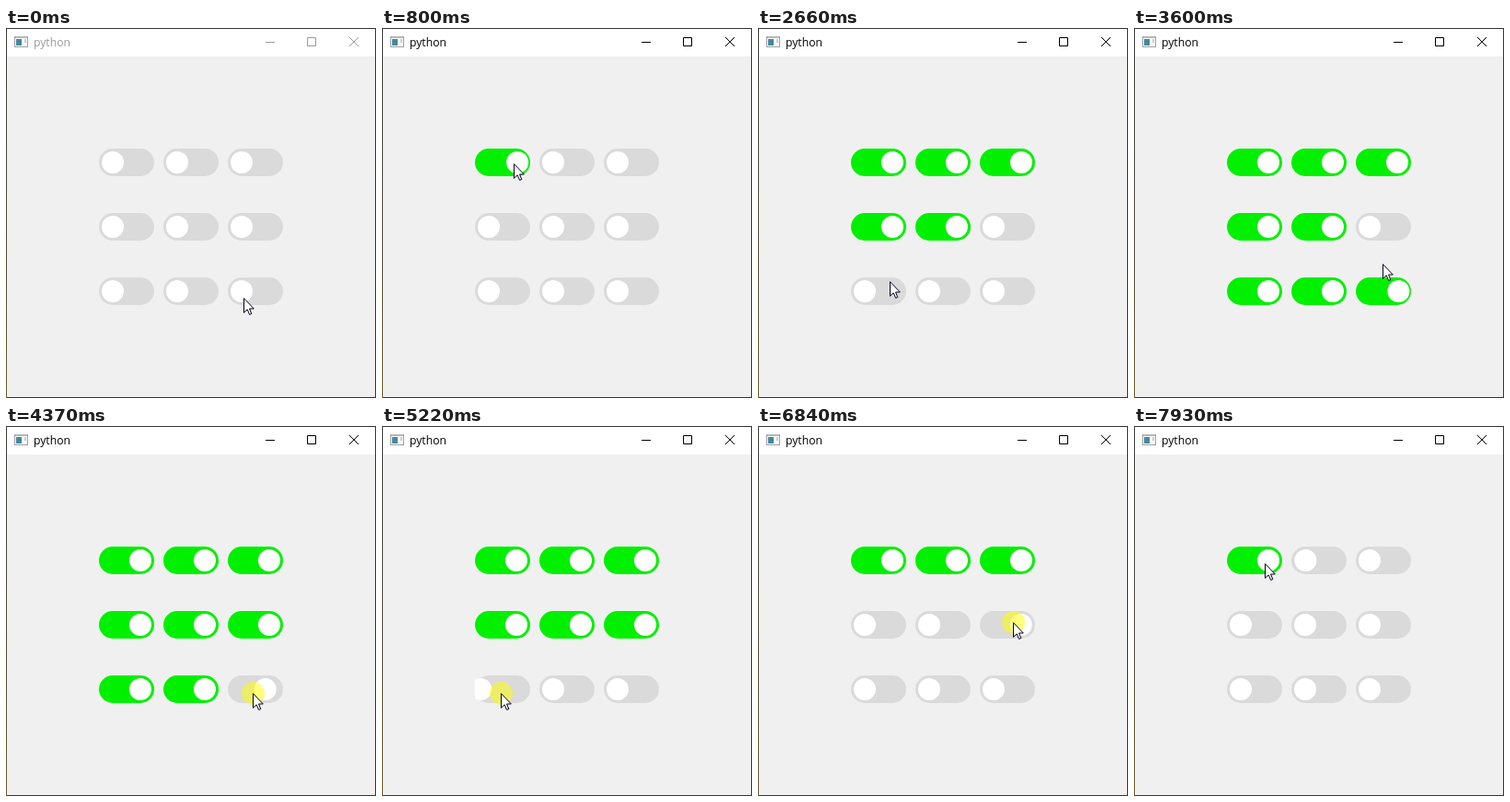
An HTML page for the animation above (8 s loop, 402 by 402 pixels).

```html
<!DOCTYPE html>
<html lang="en">
<head>
<meta charset="utf-8">
<title>Toggle switches</title>
<style>
  html, body { margin: 0; width: 100%; height: 100%; overflow: hidden; background: #f0f0f0; }
  svg { display: block; width: 402px; height: 402px; }
  text { font: 12.2px "Open Sans", "Noto Sans", sans-serif; }
</style>
</head>
<body>
<svg viewBox="0 0 402 402" xmlns="http://www.w3.org/2000/svg">
  <defs>
    <linearGradient id="edge" x1="0" y1="0" x2="0" y2="1">
      <stop offset="0" stop-color="#3a3a38"/>
      <stop offset=".6" stop-color="#4c4835"/>
      <stop offset="1" stop-color="#6b5a22"/>
    </linearGradient>
  </defs>
  <rect width="402" height="402" fill="#353533"/>
  <rect width="1" height="402" fill="url(#edge)"/>
  <rect x="1" y="1" width="400" height="400" fill="#f0f0f0"/>
  <rect x="1" y="1" width="400" height="30" fill="#fff"/>

  <g>
    <rect x="9.5" y="9.5" width="14" height="11" fill="#fafafa" stroke="#9aa0a4"/>
    <rect x="10" y="9" width="13" height="2" fill="#b4b8bb"/>
    <rect x="11" y="12" width="6" height="7" fill="#45899a"/>
    <rect x="20" y="12" width="2" height="4" fill="#c9cdd0"/>
  </g>

  <text id="title" x="30" y="20">python</text>
  <g id="buttons" fill="none">
    <path d="M282 15.5h10M327.5 10.5h9v9h-9z"/>
    <path d="M373 10l10 10M383 10L373 20"/>
  </g>

  <g id="switches"></g>
  <g id="pointer">
    <circle id="halo" cx=".5" cy=".5" r="12.5" fill="#ffff00" fill-opacity=".52"/>
    <path d="M.5 .7V16.3L4.2 12.8 6.6 18.4 8.8 17.5 6.5 12H11.3Z" fill="#fff" stroke="#000018"/>
  </g>
</svg>
<script>
const LOOP = 8000, REPAINT = 77.5, PHASE = 17.5;
const EASE_MS = 500, HOLD_MS = 100;
const LEFT = 101, TOP = 131, PITCH = 70, WIDTH = 60, HEIGHT = 30;

// Pointer route as time, x, y; every stop but the first and last is a click
const route = [
  [0, 258, 293],
  [560, 123, 147], [1070, 205, 146], [1470, 271, 145],
  [1900, 198, 213], [2310, 134, 218],
  [2755, 145, 290], [3100, 206, 290], [3365, 269, 290], [3730, 271, 209],
  [4350, 268, 290], [4800, 201, 290], [5157, 129, 290],
  [5640, 133, 219], [6215, 192, 211], [6837, 277, 213],
  [7230, 272, 154], [7615, 211, 152],
  [7922, 142, 149]
];
const clicks = route.slice(1, -1);

const $ = id => document.getElementById(id);
const lerp = (a, b, p) => a + (b - a) * p;
const smooth = p => p * p * (3 - 2 * p);
const outElastic = p => p >= 1 ? 1
  : 1 + 2 ** (-10 * p) * Math.sin((p - 0.075) * 2 * Math.PI / 0.3);

// The screen is repainted at a fixed rate
const repaintTime = t =>
  Math.max(0, Math.floor((t - PHASE) / REPAINT) * REPAINT + PHASE);

// Rest briefly at each stop, then glide to the next
function pointerAt(t) {
  const next = route.findIndex(stop => stop[0] > t);
  if (next < 0) return route[route.length - 1].slice(1);
  const [t0, x0, y0] = route[next - 1], [t1, x1, y1] = route[next];
  const p = smooth(Math.max(0, (t - t0 - HOLD_MS) / (t1 - t0 - HOLD_MS)));
  return [Math.round(lerp(x0, x1, p)), Math.round(lerp(y0, y1, p))];
}

function add(parent, tag, attrs) {
  const node = document.createElementNS("http://www.w3.org/2000/svg", tag);
  for (const key in attrs) node.setAttribute(key, attrs[key]);
  return parent.appendChild(node);
}

function makeSwitch(x, y) {
  // The nested viewport cuts off a knob that overshoots
  const box = add($("switches"), "svg", { x, y, width: WIDTH, height: HEIGHT, overflow: "hidden" });
  const hit = ([, px, py]) => px >= x && px < x + WIDTH && py >= y && py < y + HEIGHT;
  return {
    track: add(box, "rect", { width: WIDTH, height: HEIGHT, rx: HEIGHT / 2 }),
    knob: add(box, "circle", { cy: HEIGHT / 2, r: 12, fill: "#fff" }),
    times: clicks.filter(hit).map(click => click[0])
  };
}

const switches = Array.from({ length: 9 }, (_, i) =>
  makeSwitch(LEFT + PITCH * (i % 3), TOP + PITCH * Math.floor(i / 3)));

function drawSwitch({ track, knob, times }, t) {
  const past = times.filter(time => time <= t);
  const on = past.length % 2 === 1;
  const p = past.length ? outElastic((t - past[past.length - 1]) / EASE_MS) : 1;
  track.setAttribute("fill", on ? "#00f000" : "#dadada");
  knob.setAttribute("cx", on ? lerp(15, 45, p) : lerp(45, 15, p));
}

function draw(clock) {
  const t = repaintTime(clock);
  const ink = t >= clicks[0][0] ? "#000" : "#999";
  const pressed = clicks.some(([time]) => t >= time && t < time + HOLD_MS);

  $("title").setAttribute("fill", ink);
  $("buttons").setAttribute("stroke", ink);
  switches.forEach(s => drawSwitch(s, t));
  $("pointer").setAttribute("transform", `translate(${pointerAt(t)})`);
  $("halo").setAttribute("visibility", pressed ? "visible" : "hidden");
}

const begin = performance.now();
function tick() {
  draw((performance.now() - begin) % LOOP);
  requestAnimationFrame(tick);
}
tick();
</script>
</body>
</html>
```
